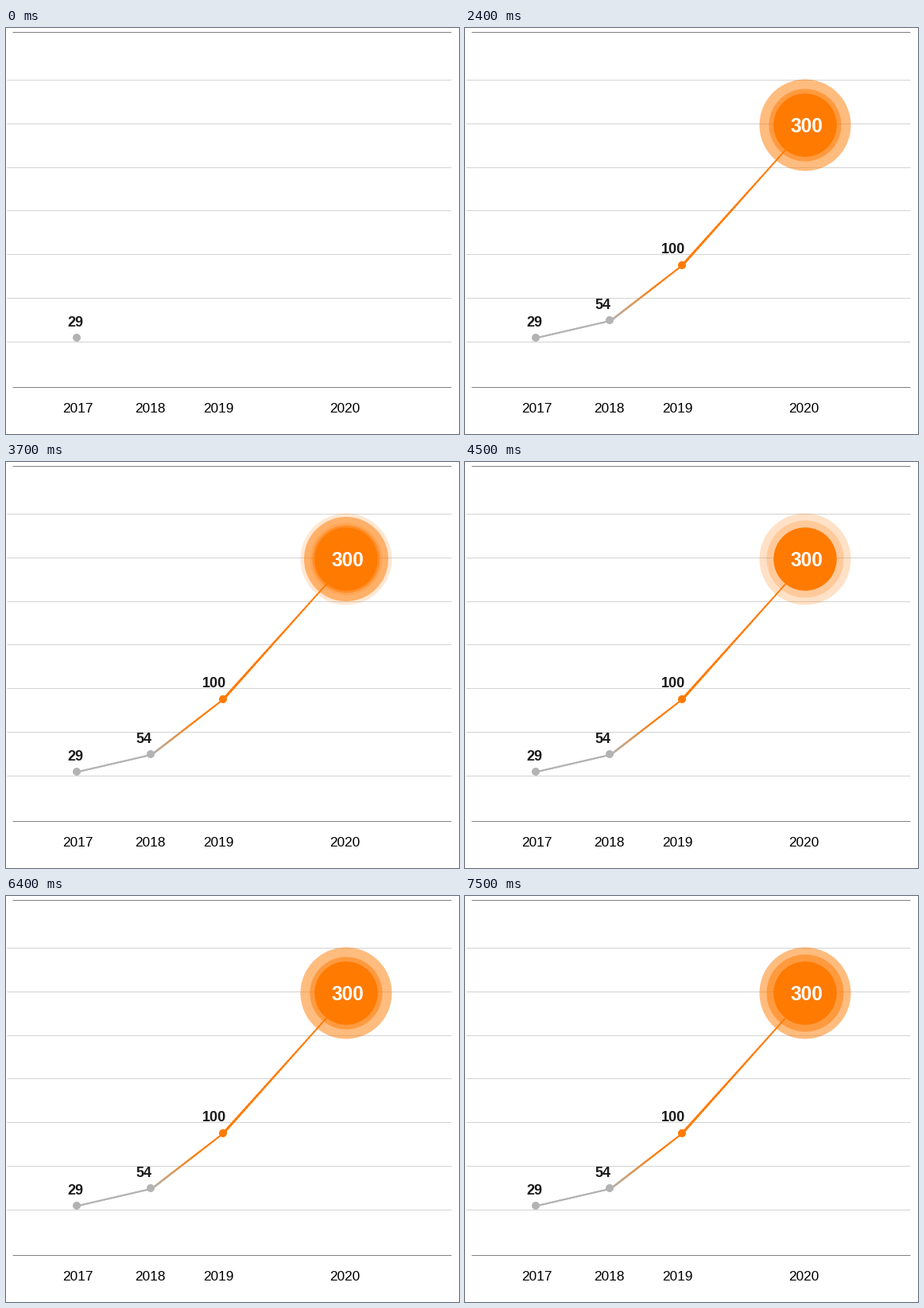
A matplotlib script for the animation above (7.6 s loop, 570 px wide and 510 px high).

```python
import matplotlib.pyplot as plt
import numpy as np
from matplotlib.animation import FuncAnimation
from matplotlib.collections import LineCollection
from matplotlib.colors import to_rgb
from matplotlib.patches import Circle

W, H, DPI = 570, 510, 60
PX = 72 / DPI
STEP, LOOP = 100, 7600
GREY, ORANGE, INK = "#b3b3b3", "#ff7a00", "#1a1a1a"
HUB = (428, 122)

fig = plt.figure(figsize=(W / DPI, H / DPI), dpi=DPI, facecolor="white")
ax = fig.add_axes([0, 0, 1, 1])
ax.set(xlim=(0, W), ylim=(H, 0))
ax.axis("off")


def rule(y, x0, color):
    ax.plot([x0, 560], [y + 0.5] * 2, color=color, lw=PX, zorder=1,
            solid_capstyle="butt")


def label(x, y, text, size, color=INK, weight="bold", z=8):
    return ax.text(x, y, text, fontsize=size * PX, color=color, weight=weight,
                   family="Liberation Sans", ha="center", va="baseline",
                   zorder=z)


def disc(center, radius, color, z, alpha=1):
    patch = Circle(center, radius, fc=color, ec="none", lw=0, alpha=alpha,
                   zorder=z)
    return ax.add_patch(patch)


class Stroke:
    """A tapered line with a colour blend that grows from start to end."""

    def __init__(self, start, end, widths, colors, times, blend=1.0, n=40):
        self.start, self.end = np.array(start), np.array(end)
        self.times = times
        mix = np.clip(np.linspace(0, 1, n) / blend, 0, 1)[:, None]
        first, last = (np.array(to_rgb(c)) for c in colors)
        self.n = n
        self.shades = first + (last - first) * mix
        self.art = LineCollection([], linewidths=np.linspace(*widths, n) * PX,
                                  capstyle="projecting", zorder=3)
        ax.add_collection(self.art)

    def draw(self, t):
        grown = np.interp(t, self.times, (0, 1))
        self.art.set_visible(grown > 0)
        steps = np.linspace(0, grown, self.n + 1)[:, None]
        pts = self.start + (self.end - self.start) * steps
        self.art.set_segments(np.stack([pts[:-1], pts[1:]], axis=1))
        shown = np.linspace(0, grown, self.n) * (self.n - 1)
        self.art.set_color(self.shades[shown.astype(int)])


# Grid and axis labels
for y in (4, 450):
    rule(y, 8, "#808080")
for y in (64, 119, 174, 228, 283, 338, 393):
    rule(y, 1, "#d3d3d3")
for x, year in ((90, 2017), (181.7, 2018), (267.3, 2019), (426.3, 2020)):
    label(x, 483, str(year), 17.3, "black", "normal")

# Data points: position, colour, value, label position, time of appearance
points = []
for pos, color, value, spot, start in (
        ((89, 389), GREY, "29", (87.7, 375), 0),
        ((182, 367), GREY, "54", (173.5, 353), 400),
        ((273, 298), ORANGE, "100", (262, 283), 900)):
    points.append((start, disc(pos, 5, color, 4),
                   label(*spot, value, 18)))

strokes = [
    Stroke((89, 389.5), (182, 368), (2, 2), (GREY, GREY), (0, 400)),
    Stroke((183, 368), (273, 298.5), (2.5, 1.8), (GREY, ORANGE), (500, 900),
           0.65),
    Stroke((273.5, 298), (404, 152.5), (3, 1.7), (ORANGE, ORANGE),
           (900, 1640)),
]

hub = [disc(HUB, 39.7, ORANGE, 6),
       label(430.3, 131, "300", 24.5, "white")]

# Each halo is a pair of radii with opacity keys over time
HALOS = [
    ((42.5, 53),
     (1900, 2100, 2400, 3200, 3500, 3700, 3900, 4900, 5400, 5500, 5600, 5800),
     (0, .5, 0, 0, .5, .5, 0, 0, .5, .5, .25, 0)),
    ((45.5, 57.5),
     (2100, 2400, 2600, 3000, 3600, 3700, 3900, 4000, 4200, 5500, 5600, 5700,
      6500, 7300),
     (0, .5, .5, 0, 0, .17, .5, .5, 0, 0, .24, .5, .5, 0)),
    ((48.5, 57.5),
     (2600, 3000, 3200, 3500, 4000, 4200, 4300, 4500, 4800, 6500, 7300),
     (0, .5, .5, 0, 0, .5, .5, .22, 0, 0, .5)),
]
halos = [([disc(HUB, r, ORANGE, 5, 0) for r in radii], times, alphas)
         for radii, times, alphas in HALOS]


def update(i):
    t = i * STEP
    for start, *parts in points:
        for part in parts:
            part.set_visible(t >= start)
    for stroke in strokes:
        stroke.draw(t)
    for part in hub:
        part.set_alpha(np.interp(t, (1600, 2000), (0, 1)))
    for rings, times, alphas in halos:
        for ring in rings:
            ring.set_alpha(np.interp(t, times, alphas))
    return []


anim = FuncAnimation(fig, update, frames=LOOP // STEP, interval=STEP,
                     init_func=lambda: update(0), repeat=True, repeat_delay=0)
plt.show()
```
